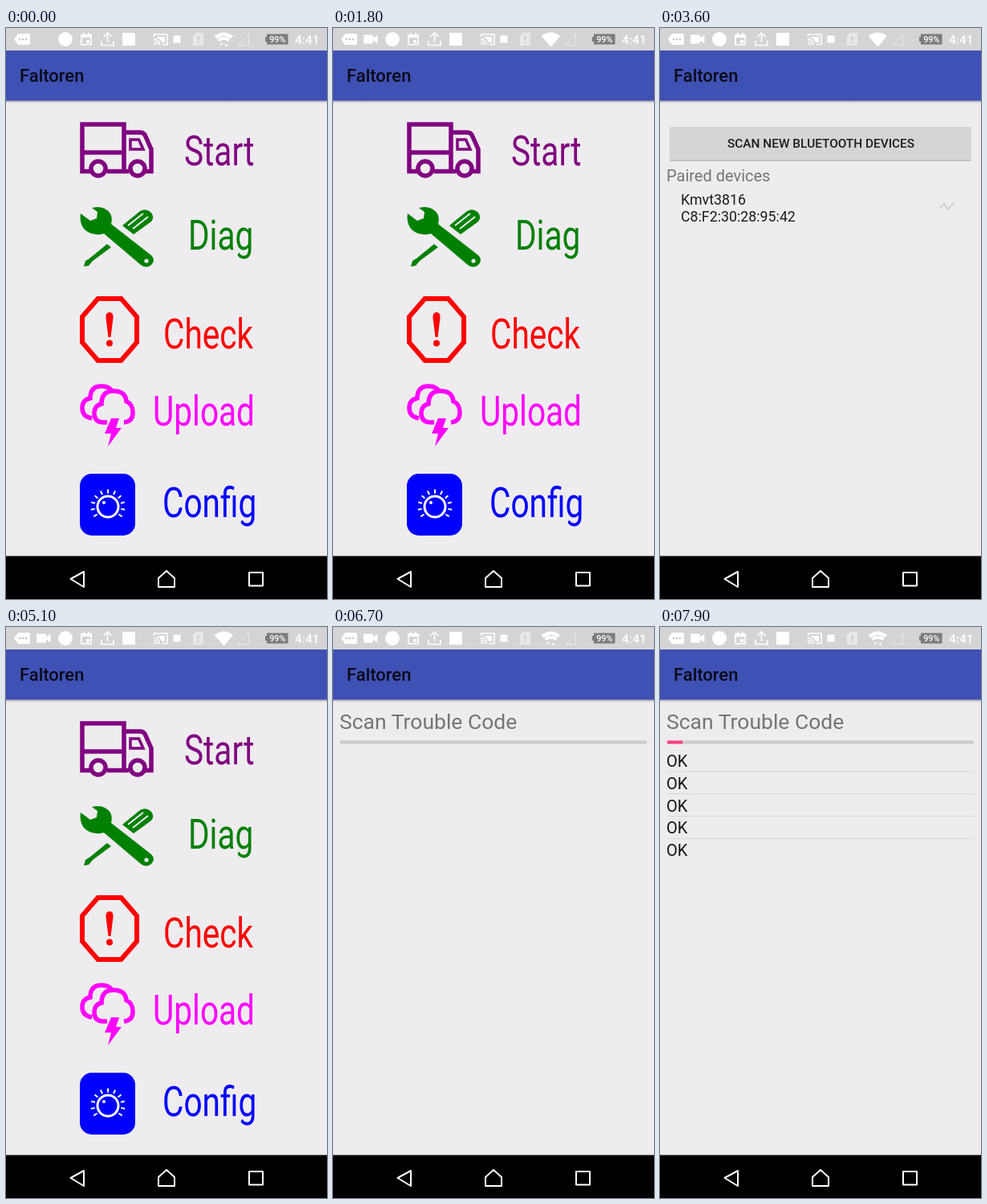
An HTML page that plays this animation: 400x711 px, repeating every 8000 ms.

```html
<!DOCTYPE html>
<html lang="en">
<head>
<meta charset="utf-8">
<title>Vehicle app</title>
<style>
  html, body { margin: 0; width: 100%; height: 100%; overflow: hidden; background: #eeecef; }
  svg { display: block; width: 100vw; height: 100vh; }
  text { font-family: Roboto, "Noto Sans", sans-serif; white-space: pre; }
  .medium { font-weight: 500; }
  .line { fill: none; stroke: currentColor; }
  .label { font-size: 52px; fill: currentColor; }
  .row { font-size: 20px; fill: #111; }
</style>
</head>
<body>
<svg viewBox="0 0 400 711" preserveAspectRatio="none">
  <defs>
    <linearGradient id="shade" x2="0" y2="1">
      <stop stop-color="#a5a3a9"/>
      <stop offset="1" stop-color="#eeecef"/>
    </linearGradient>
  </defs>
  <rect width="400" height="711" fill="#eeecef"/>

  <g id="menu">
    <g color="#800080">
      <g class="line" stroke-width="5.5">
        <path d="M105 178.5H95V120H147V155H95M126 178.5H153M147 155V178M147 130H167Q171 130 173 133L181 151V178.5H174"/>
        <circle cx="115" cy="175" r="9"/>
        <circle cx="164" cy="175" r="9"/>
        <path d="M155 139H165.500L171 151H155Z" stroke-width="3.500"/>
      </g>
    </g>
    <g color="#008000" fill="currentColor">
      <path d="M107 224Q122 220 130 231Q133 237 131 244L181 283Q187 289 181 295Q175 300 168 295L122 256Q108 260 98 251Q91 243 93 231L105 240L113 237L114 229Z"/>
      <circle cx="175" cy="290" r="2.600" fill="#eeecef"/>
      <path d="M145 246L167 228Q174 224 180 229Q186 235 181 241L159 257Z"/>
      <path d="M152 246L171 231M158 250L177 235" stroke="#eeecef" stroke-width="2"/>
      <path d="M126 269L131 273L108 290L103 296L97 297L99 290L104 287Z"/>
    </g>
    <g color="#f00">
      <path class="line" stroke-width="6" d="M114.500 337H143.500L163 359.500V391.500L143.500 414H114.500L95 391.500V359.500Z"/>
      <path fill="currentColor" d="M129 354Q134 354 133.500 361L130.500 385H127.500L124.500 361Q124 354 129 354Z"/>
      <circle cx="129" cy="392.500" r="4" fill="currentColor"/>
    </g>
    <g color="#f0f">
      <path class="line" stroke-width="5.500" d="M107 486Q95 484 95 473Q95 463 105 461Q105 446 119 446Q130 446 133 454M126 491H120Q110 490 110 480Q110 470 119 468Q119 452 134 452Q149 452 150 465Q158 468 158 479Q158 490 147 491"/>
      <path fill="currentColor" d="M131 486H141L137 498H144L127 521L131 505H123Z"/>
    </g>
    <rect x="92" y="555" width="69" height="77" rx="15" fill="#00f"/>
    <g id="dial" fill="none" stroke="#fff">
      <circle cx="127" cy="596" r="13" stroke-width="3"/>
      <circle cx="122" cy="591" r="2" fill="#fff" stroke="none"/>
    </g>
  </g>

  <g id="pairing">
    <rect x="12" y="124" width="376" height="42" rx="2" fill="#c3c1c4"/>
    <rect x="12" y="123" width="376" height="41" rx="2" fill="#d6d4d7"/>
    <text class="medium" x="200.500" y="149" font-size="15.400" text-anchor="middle" fill="#1c1c1c">SCAN NEW BLUETOOTH DEVICES</text>
    <text x="8" y="191" font-size="20" fill="#757477">Paired devices</text>
    <g font-size="17.800" fill="#1c1c1c">
      <text x="26" y="220">Kmvt3816</text>
      <text x="26" y="241">C8:F2:30:28:95:42</text>
    </g>
    <path d="M349 224L354 219L358.500 225.500L367.500 217" fill="none" stroke="#cbc9cc" stroke-width="1.500"/>
  </g>

  <g id="scan">
    <text x="8" y="127" font-size="26.500" fill="#757477">Scan Trouble Code</text>
    <rect x="9" y="141.500" width="382" height="4" fill="#cbc9cc"/>
    <rect id="bar" x="9" y="141.500" width="0" height="4" fill="#ff4081"/>
    <g id="rows"></g>
  </g>

  <rect y="90" width="400" height="4" fill="url(#shade)"/>
  <rect y="28" width="400" height="62.500" fill="#3f51b5"/>
  <text class="medium" x="17" y="67" font-size="22" fill="#080a16">Faltoren</text>

  <rect width="400" height="28" fill="#d4d3d5"/>
  <g fill="#fff">
    <path d="M10 14L15 7H28Q30 7 30 9V19Q30 21 28 21H15Z"/>
    <g fill="#c6c5c7">
      <circle cx="17" cy="14" r="1.300"/><circle cx="21" cy="14" r="1.300"/><circle cx="25" cy="14" r="1.300"/>
    </g>
    <path id="camera" d="M39 8.500H49Q50 8.500 50 9.500V12.500L55.500 8.500V19.500L50 15.500V18.500Q50 19.500 49 19.500H39Q38 19.500 38 18.500V9.500Q38 8.500 39 8.500Z"/>
    <circle cx="74" cy="14" r="9"/>
    <path fill-rule="evenodd" d="M93 8H96V6H98V8H102V6H104V8H107V21.500H93ZM94.700 12V20H105.300V12ZM100 15H104V19H100Z"/>
    <path d="M119 16V21.500H134V16" fill="none" stroke="#fff" stroke-width="1.700"/>
    <path d="M126.500 6V18M121.500 11L126.500 6L131.500 11" fill="none" stroke="#fff" stroke-width="1.700"/>
    <rect x="145" y="6" width="16" height="16"/>
    <g fill="none" stroke="#fff" stroke-width="1.600">
      <path d="M184.500 11V8H201V20.500H194.500M184 13.500A7.500 7.500 0 0 1 191.500 21M184 16.500A4.500 4.500 0 0 1 188.500 21"/>
    </g>
    <path d="M188 11H198V18H194Q192 13 188 12Z"/>
    <circle cx="185" cy="20" r="1.300"/>
    <rect x="208.500" y="9.500" width="9" height="9"/>
    <path d="M237 6H246V22H233V10Z" fill="#e8e7e9"/>
    <path d="M239.500 10V15.500M239.500 17V19" stroke="#c9c8ca" stroke-width="2"/>
    <g id="wifi">
      <path d="M259.500 10Q271.500 1 283 10L271.500 23.500Z"/>
      <g id="traffic">
        <path d="M262 13.500L271.500 9.500L281 13.500L275 24H268Z" fill="#d4d3d5"/>
        <path d="M263.500 14Q271.500 8 279.500 14L277 17Q271.500 12.500 266 17Z"/>
        <path class="arrow" d="M266.500 19H270.500L268.500 22.500ZM272.500 22.500H276.500L274.500 19Z"/>
      </g>
    </g>
    <path d="M289.500 21.500H302.500V7Z" fill="none" stroke="#e9e8ea"/>
    <path d="M325 7.500H351.500V20.500H325V17H323V11H325Z" fill="#7c7b7d"/>
    <text class="medium" x="338.300" y="18" font-size="10.800" text-anchor="middle">99%</text>
    <text class="medium" x="360" y="20" font-size="15.500">4:41</text>
  </g>

  <rect y="657.500" width="400" height="54" fill="#000"/>
  <g fill="none" stroke="#fff" stroke-width="2" stroke-linejoin="round">
    <path d="M80.500 686L97 677V696Z"/>
    <path d="M190 685L200 676L210 685V696H190Z"/>
    <rect x="303" y="678" width="17" height="16.500"/>
  </g>
</svg>
<script>
const LOOP = 8000;
const $ = id => document.getElementById(id);

function add(parent, tag, attrs, text = "") {
  const el = document.createElementNS("http://www.w3.org/2000/svg", tag);
  for (const key in attrs) el.setAttribute(key, attrs[key]);
  el.textContent = text;
  return parent.appendChild(el);
}

// Condensed face shared by all menu labels
const labels = [
  ["Start", 222, 171, "#800080"],
  ["Diag", 227, 276, "#008000"],
  ["Check", 196, 399, "#f00"],
  ["Upload", 183, 495, "#f0f"],
  ["Config", 195, 609, "#00f"]
];
for (const [word, x, y, color] of labels)
  add($("menu"), "text", { class: "label", color, transform: `translate(${x} ${y}) scale(.78 1)` }, word);

for (let i = 0; i < 11; i++)
  add($("dial"), "path", { d: "M143.5 596H148.500", "stroke-width": 2, transform: `rotate(${145 + i * 25} 127 596)` });

for (let i = 0; i < 5; i++) {
  const y = 174 + i * 27.8;
  add($("rows"), "text", { class: "row", x: 8, y }, "OK");
  if (i < 4) add($("rows"), "rect", { x: 9, y: y + 5.500, width: 382, height: 1, fill: "#d8d6d9" });
}

// [start ms, value]
const screens = [[0, "menu"], [2200, "pairing"], [5100, "menu"], [6700, "scan"]];
const progress = [[0, 0], [7100, 4], [7300, 11], [7500, 15], [7900, 19]];
const at = (steps, t) => steps.filter(s => s[0] <= t).pop()[1];
const show = (id, on) => { $(id).style.display = on ? "" : "none"; };

function draw(t) {
  const screen = at(screens, t);
  for (const id of ["menu", "pairing", "scan"]) show(id, id === screen);
  show("camera", t >= 100);
  show("traffic", t < 100 || t >= 6500);
  show("rows", t >= 7300);
  $("bar").setAttribute("width", at(progress, t));
}

const start = performance.now();
function tick() {
  draw((performance.now() - start) % LOOP);
  requestAnimationFrame(tick);
}
draw(0);
requestAnimationFrame(tick);
</script>
</body>
</html>
```
